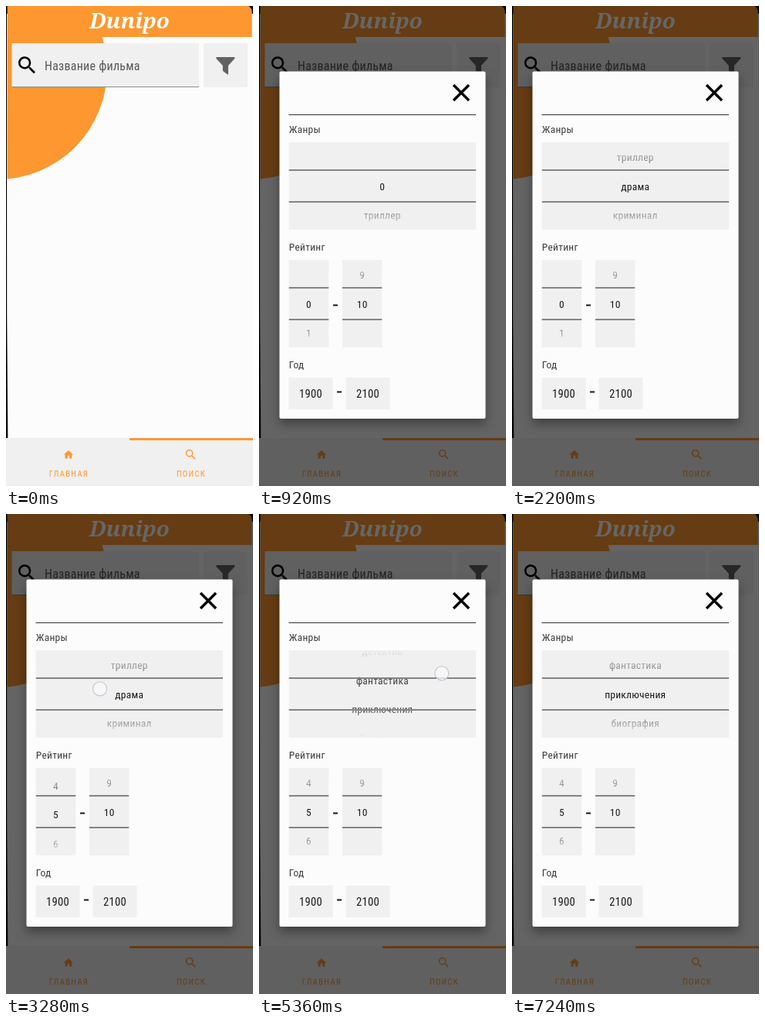
These frames come from a looping animation (320x620 px, 8000 ms). An HTML page with a canvas:

```html
<!DOCTYPE html>
<html lang="ru">
<head>
<meta charset="utf-8">
<title>Поиск фильма</title>
<style>
  html, body { margin: 0; width: 100%; height: 100%; overflow: hidden; background: #fcfcfc; }
  canvas { display: block; width: 320px; height: 620px; }
</style>
</head>
<body>
<canvas id="stage"></canvas>
<script>
const W = 320, H = 620, LOOP = 8000;
const canvas = document.getElementById('stage');
const ctx = canvas.getContext('2d');
const ratio = window.devicePixelRatio || 1;
canvas.width = W * ratio;
canvas.height = H * ratio;

const PAPER = '#fcfcfc', BOX = '#f0f0f0', ORANGE = '#fe9730', INK = '#1a1a1a';
const SANS = '"Roboto Condensed", Roboto, sans-serif';
ctx.font = `condensed 16px ${SANS}`;
const narrow = ctx.measureText('Название фильма').width < 127;

const ICONS = {
  search: new Path2D('M15.5 14h-.8l-.3-.3A6.5 6.5 0 1 0 13.7 14.4l.3.3v.8l5 5L20.5 19zm-6 0a4.5 4.5 0 1 1 0-9 4.5 4.5 0 0 1 0 9z'),
  home: new Path2D('M10 20v-6h4v6h5v-8h3L12 3 2 12h3v8z'),
  funnel: new Path2D('M3.6 3h16.8c1 0 1.3 1 .7 1.7L14.8 11.5v8.3c0 .6-.5.8-1 .4l-4-3c-.4-.3-.5-.6-.5-1v-4.7L2.9 4.7C2.3 4 2.6 3 3.6 3z')
};

const GENRES = ['0', 'триллер', 'драма', 'криминал', 'мелодрама', 'детектив',
  'фантастика', 'приключения', 'биография', 'фильм-нуар', 'вестерн'];
const SCORES = Array.from({ length: 11 }, (_, i) => String(i));

// Finger moves along `path` during `drag`, the wheel passes its item by `over`
// and has settled after `rest`. All times in ms from `at`.
const genreSwipes = [
  { at: 1320, drag: 280, rest: 880, from: 0, to: 2, over: .34, path: [[240, 274], [250, 152]] },
  { at: 4280, drag: 480, rest: 800, from: 2, to: 4, over: .39, path: [[239, 281], [229, 162]] },
  { at: 5120, drag: 440, rest: 800, from: 4, to: 8, over: .35, path: [[230, 280], [242, 150]] },
  { at: 6120, drag: 220, rest: 1000, from: 8, to: 7, over: .12, path: [[212, 191], [188, 293]] }
];
const scoreSwipes = [
  { at: 2840, drag: 480, hold: 320, rest: 1200, from: 0, to: 5, over: 0, path: [[100, 425], [122, 222]] }
];
const tap = { at: 40, drag: 400, path: [[286, 80], [286, 80]] };
const touches = [tap, ...genreSwipes, ...scoreSwipes];

const span = (t, a, b) => Math.max(0, Math.min(1, (t - a) / (b - a)));
const lerp = (a, b, p) => a + (b - a) * p;
const smooth = p => p * p * (3 - 2 * p);

function wheelPos(swipes, t) {
  const { at, drag, rest, from, to, over } = swipes.findLast(s => s.at <= t) || swipes[0];
  const moved = smooth(span(t, at, at + drag));
  const settled = smooth(span(t, at + drag, at + rest));
  return from + (to - from) * moved + over * moved * (1 - settled);
}

function rect(x, y, w, h, color) {
  ctx.fillStyle = color;
  ctx.fillRect(x, y, w, h);
}

function label(text, x, y, size, color, align = 'left', spacing = .25) {
  ctx.font = `condensed ${narrow ? size : size * .92}px ${SANS}`;
  ctx.letterSpacing = `${narrow ? spacing : spacing - .35}px`;
  ctx.textAlign = align;
  ctx.fillStyle = color;
  ctx.fillText(text, x, y);
  ctx.letterSpacing = '0px';
}

function icon(name, x, y, scale, color) {
  ctx.save();
  ctx.translate(x, y);
  ctx.scale(scale, scale);
  ctx.fillStyle = color;
  ctx.fill(ICONS[name], 'evenodd');
  ctx.restore();
}

function drawPage(dim) {
  rect(0, 0, W, H, PAPER);

  // Dark screen edge: rounded top corners and a thin wedge on the left
  rect(0, 0, W, 10, '#000');
  ctx.fillStyle = '#000';
  ctx.beginPath();
  ctx.moveTo(0, 0);
  ctx.lineTo(1, 0);
  ctx.lineTo(1.2, 400);
  ctx.lineTo(2.4, 558);
  ctx.lineTo(0, 558);
  ctx.fill();

  ctx.save();
  ctx.beginPath();
  ctx.rect(1.7, 0, 317, H);
  ctx.clip();
  ctx.fillStyle = ORANGE;
  ctx.beginPath();
  ctx.arc(-11, 82, 142, 0, Math.PI * 2);
  ctx.roundRect(1, -1, 318, 41, [9, 9, 0, 0]);
  ctx.fill();
  ctx.restore();

  ctx.font = 'italic bold 28px "Noto Serif", serif';
  ctx.textAlign = 'center';
  ctx.fillStyle = '#fff';
  ctx.fillText('Dunipo', 160, 29);

  rect(7.5, 48, 242.5, 57, BOX);
  rect(7.5, 104, 242.5, 1, '#8c8c8c');
  icon('search', 12.3, 61.5, 1.25, '#000');
  label('Название фильма', 50, 82.5, 16, '#585858');
  rect(256, 48, 57, 57, BOX);
  icon('funnel', 268.7, 62, 1.3, '#626262');

  rect(0, 558, W, 62, BOX);
  rect(160, 558, 160, 3, ORANGE);
  icon('home', 73.5, 572.1, .62, ORANGE);
  icon('search', 230.6, 570.6, .74, ORANGE);
  label('ГЛАВНАЯ', 81.5, 607.8, 10.7, ORANGE, 'center', 1.3);
  label('ПОИСК', 240, 607.8, 10.7, ORANGE, 'center', 1.3);

  rect(0, 0, W, H, `rgba(0,0,0,${.6 * dim})`);
}

function picker(x, y, w, items, pos) {
  const h = 113, mid = y + 57, step = 37.5, fade = 50;
  ctx.save();
  ctx.beginPath();
  ctx.rect(x, y, w, h);
  ctx.clip();
  rect(x, y, w, h, BOX);
  items.forEach((item, i) => {
    label(item, x + w / 2, mid + (i - pos) * step + 4.8, 13.5, INK, 'center');
  });
  for (const [edge, inner] of [[y, y + fade], [y + h, y + h - fade]]) {
    const g = ctx.createLinearGradient(0, edge, 0, inner);
    g.addColorStop(0, BOX);
    g.addColorStop(1, BOX + '00');
    rect(x, Math.min(edge, inner), w, fade, g);
  }
  rect(x, y + 35, w, 2, '#848484');
  rect(x, y + 76, w, 2, '#848484');
  ctx.restore();
}

function drawDialog(t) {
  const alpha = span(t, 560, 764);
  if (!alpha) return;
  const scale = lerp(1, .9, (1 - span(t, 560, 760)) ** 3);
  ctx.save();
  ctx.globalAlpha = alpha;
  ctx.translate(160, 309);
  ctx.scale(scale, scale);
  ctx.translate(-160, -309);

  ctx.save();
  ctx.shadowColor = 'rgba(0,0,0,.36)';
  ctx.shadowBlur = 14 * ratio;
  ctx.shadowOffsetY = 7 * ratio;
  ctx.fillStyle = PAPER;
  ctx.beginPath();
  ctx.roundRect(26.5, 84.5, 267, 448.5, 2);
  ctx.fill();
  ctx.restore();

  ctx.strokeStyle = '#000';
  ctx.lineWidth = 3.4;
  ctx.beginPath();
  for (const side of [-10, 10]) {
    ctx.moveTo(262 - side, 102);
    ctx.lineTo(262 + side, 122);
  }
  ctx.stroke();
  rect(38.5, 140, 242.5, 1, '#333');

  ['Жанры', 'Рейтинг', 'Год'].forEach((text, i) => label(text, 38.8, 164 + i * 152, 13.5, '#3c3c3c'));
  picker(38.5, 176, 242.5, GENRES, wheelPos(genreSwipes, t));
  picker(38.5, 328, 52, SCORES, wheelPos(scoreSwipes, t));
  picker(108, 328, 51.5, SCORES, 10);
  rect(96, 385.5, 6, 2, INK);
  rect(101, 497.5, 6, 2, INK);
  for (const [x, year] of [[38.5, '1900'], [112.5, '2100']]) {
    rect(x, 480, 57, 41, BOX);
    label(year, x + 28.6, 506, 14.7, INK, 'center');
  }
  ctx.restore();
}

function drawTouch({ at, drag, hold = 0, path: [[x0, y0], [x1, y1]] }, t) {
  const lift = at + drag + hold;
  const alpha = span(t, at - 20, at + 40) * (1 - span(t, lift, lift + 80));
  if (!alpha) return;
  const p = smooth(span(t, at, at + drag));
  ctx.save();
  ctx.globalAlpha = alpha;
  ctx.beginPath();
  ctx.arc(lerp(x0, x1, p), lerp(y0, y1, p), 9, 0, Math.PI * 2);
  ctx.fillStyle = 'rgba(250,250,253,.75)';
  ctx.fill();
  ctx.strokeStyle = '#c2c2ca';
  ctx.lineWidth = 1.1;
  ctx.stroke();
  ctx.restore();
}

function draw(t) {
  ctx.setTransform(ratio, 0, 0, ratio, 0, 0);
  drawPage(span(t, 560, 900));
  drawDialog(t);
  touches.forEach(touch => drawTouch(touch, t));
}

const begin = performance.now();
function frame() {
  draw((performance.now() - begin) % LOOP);
  requestAnimationFrame(frame);
}
frame();
</script>
</body>
</html>
```
